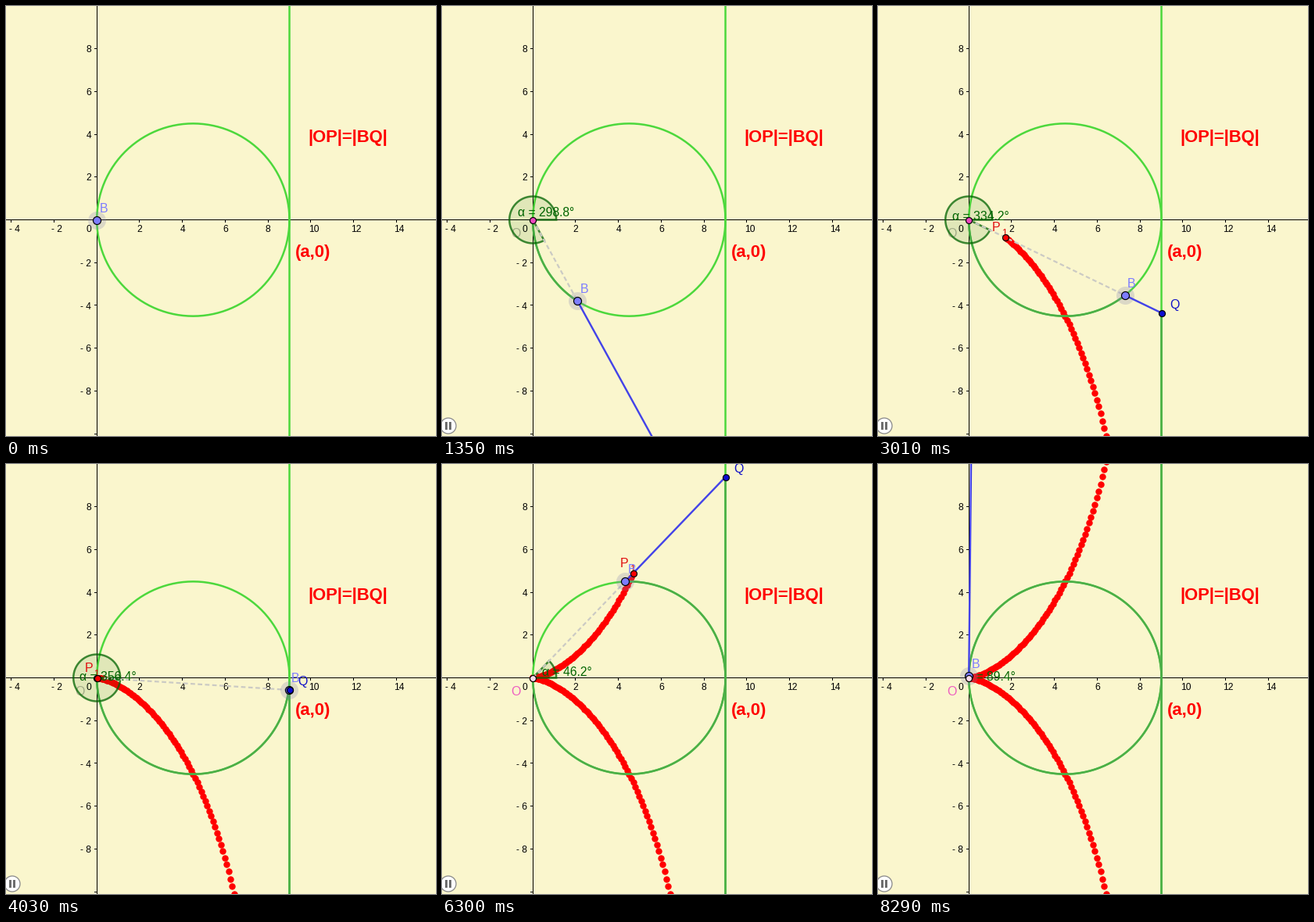
A matplotlib script that plays this animation: 550 by 550 pixels, repeating every 8.36 s.

```python
import numpy as np
import matplotlib
import matplotlib.pyplot as plt
from matplotlib.animation import FuncAnimation
from matplotlib.patches import Circle, Polygon, Rectangle

SIZE, DPI = 550, 100
PX = 72 / DPI                      # points per pixel
LOOP, TICK = 8360, 20
OX, OY, UNIT = 116.2, 273.5, 27.37
A = 9                              # circle diameter
STEP = 0.6                         # degrees per slider step

BG = "#faf6cd"
GREEN, WORN = "#4cd83c", "#4cae48"
RED, LILAC = "#ff0000", "#7d7dff"

# picture index against time, slider step against picture index
TIMES = [0, 70, 970, 1850, 2750, 3650, 4530, 4980, 5420, 6300, 7200, 8100, 8290]
INDEX = [0, 1, 15, 29, 43, 57, 71, 78, 84, 98, 112, 126, 129]
KEY_INDEX = [0, 10, 32, 63, 78, 98, 129]
KEY_STEP = [0, 22, 73, 144, 179, 227, 299]

matplotlib.rcParams["font.family"] = "Liberation Sans"
fig = plt.figure(figsize=(SIZE / DPI, SIZE / DPI), dpi=DPI, facecolor=BG)
ax = fig.add_axes([0, 0, 1, 1])
ax.set_xlim(0, SIZE)
ax.set_ylim(SIZE, 0)
ax.axis("off")


def to_px(x, y):
    return OX + x * UNIT, OY - y * UNIT


def line(color, width, z, xs=(), ys=(), **kw):
    return ax.plot(xs, ys, color=color, lw=width * PX, zorder=z, snap=False, **kw)[0]


def bar(x, y, w, h):
    ax.add_patch(Rectangle((x, y), w, h, fc="black", lw=0, zorder=1,
                           antialiased=False))


def dot(color, radius, z, edge="black", width=1.2):
    return ax.plot([], [], "o", ms=2 * radius * PX, mfc=color, mec=edge,
                   mew=width * PX, zorder=z, snap=False)[0]


def text(x, y, s, size, color, z=4, **kw):
    return ax.text(x, y, s, fontsize=size * PX, color=color, zorder=z,
                   va="baseline", **kw)


def polar(r, theta):
    return to_px(r * np.cos(theta), r * np.sin(theta))


def circle_arc(theta):
    return polar(A * np.cos(theta), theta)


def cissoid(theta):
    return polar(A * np.sin(theta) ** 2 / np.cos(theta), theta)


def draw_axes():
    bar(0, 273, SIZE, 1)
    bar(116, 0, 1, SIZE)
    for v in range(-10, 16, 2):
        name = f"- {-v}" if v < 0 else str(v)
        x, y = to_px(v, v)
        if v >= -4 and v != 0:
            bar(int(x), 274, 1, 3)
            text(x - 3.2, 289, name, 12, "black", 1)
        if -10 <= v <= 8 and v != 0:
            bar(113, int(y), 3, 1)
            if v > -10:
                text(109, y + 4.7, name, 12, "black", 1, ha="right")
    text(109, 289, "0", 12, "black", 1, ha="right")


def draw_pause():
    parts = [Circle((8, 537), 10, fc="white", ec="#8c8c8c", lw=1.3 * PX, zorder=12)]
    parts += [Rectangle((x, 532), 3.4, 10, fc="#6e6e6e", zorder=13)
              for x in (3.5, 9)]
    for p in parts:
        ax.add_patch(p)
    return parts


draw_axes()
full = np.linspace(-np.pi / 2, np.pi / 2, 241)
line(GREEN, 2.5, 1.5, *circle_arc(full))
wall = to_px(A, 0)[0]
line(GREEN, 2.5, 1.5, [wall, wall], [0, SIZE])
text(386, 174, "|OP|=|BQ|", 22, RED, 5, weight="bold")
text(370, 321, "(a,0)", 22, RED, 5, weight="bold")
pause = draw_pause()

# the trace lies on the background, under every other object
trail = dot(RED, 4.2, 1.2, RED, 0)
worn_arc = line(WORN, 2.5, 1.6)
worn_wall = line(WORN, 2.5, 1.6)
o_label = text(88, 296, "O", 16, "#ee5cc0", 2)
sector = ax.add_patch(Polygon([[0, 0]] * 3, fc=(0, 0.39, 0, 0.1),
                              ec=(0, 0.39, 0, 0.75), lw=2.5 * PX, zorder=3))
angle = text(0, 0, "", 15.7, "#006400", 4)
ray = line("#cbcac4", 2.2, 3.5, dashes=(2.6, 1.6))
chord = line("#4343e8", 2.4, 7)
p_label = text(0, 0, "P", 16, "#e01010", 5.5)
p_sub = text(0, 0, "1", 12, "#e01010", 5.5)
q_label = text(0, 0, "Q", 16, "#1010c8", 9)
b_label = text(0, 0, "B", 16, LILAC, 9)
halo = dot((0.5, 0.5, 0.7, 0.25), 11.5, 6, "none", 0)
b_dot = dot(LILAC, 5, 8)
o_dot = dot("#ee48c0", 4, 8.5)
p_dot = dot(RED, 4, 9)
q_dot = dot("#0c0cd0", 4, 9)
moving = pause + [worn_arc, worn_wall, o_label, sector, angle, ray, chord, trail,
                  p_label, p_sub, q_label, o_dot, p_dot, q_dot]


def slider(ms):
    i = np.floor(np.interp(ms, TIMES, INDEX) + 0.01)
    return int(np.floor(np.interp(i, KEY_INDEX, KEY_STEP) + 0.5))


def put(artist, x, y):
    artist.set_data([x], [y])


def update(k):
    step = slider(k * TICK + TICK / 2)
    theta = np.radians(step * STEP - 90)
    bx, by = circle_arc(theta)
    put(halo, bx, by)
    put(b_dot, bx, by)
    b_label.set_position((bx + 3.3, by - 10))
    for m in moving:
        m.set_visible(step > 0)
    if step == 0:
        return []

    qx, qy = to_px(A, A * np.tan(theta))
    past = np.radians(np.arange(1, step + 1) * STEP - 90)
    tx, ty = cissoid(past)
    px, py = tx[-1], ty[-1]
    seen = (ty > -20) & (ty < SIZE + 20)
    trail.set_data(tx[seen], ty[seen])
    worn_arc.set_data(*circle_arc(past))
    worn_wall.set_data([wall, wall], [SIZE + 5, np.clip(qy, -5, SIZE + 5)])

    # angle mark shrinks when B comes near the origin
    turn = theta % (2 * np.pi)
    r = min(30, np.hypot(bx - OX, by - OY) / 2)
    sweep = np.linspace(0, turn, 60)
    xs = np.r_[OX, OX + r * np.cos(sweep)]
    ys = np.r_[OY, OY - r * np.sin(sweep)]
    sector.set_xy(np.c_[xs, ys])
    angle.set_text(f"α = {np.degrees(turn):.1f}°")
    angle.set_position((OX + r / 1.7 * np.cos(turn / 2) - 4.4,
                        OY - r / 1.7 * np.sin(turn / 2) + 4.5))

    ray.set_data([OX, bx], [OY, by])
    chord.set_data([bx, qx], [by, qy])
    put(o_dot, OX, OY)
    put(p_dot, px, py)
    put(q_dot, qx, qy)
    for label, x, y in ((p_label, px - 16.8, py - 7.8), (p_sub, px - 4.8, py - 2),
                        (q_label, qx + 10.8, qy - 6)):
        label.set_position((x, y))
        label.set_visible(-20 < y < SIZE + 20)
    early = step < 150
    o_dot.set_markerfacecolor("#ee48c0" if early else "#f8dcea")
    o_label.set_color("#b4b496" if early else "#ee5cc0")
    return []


anim = FuncAnimation(fig, update, frames=LOOP // TICK, interval=TICK,
                     repeat=True, repeat_delay=0, blit=False)
plt.show()
```
